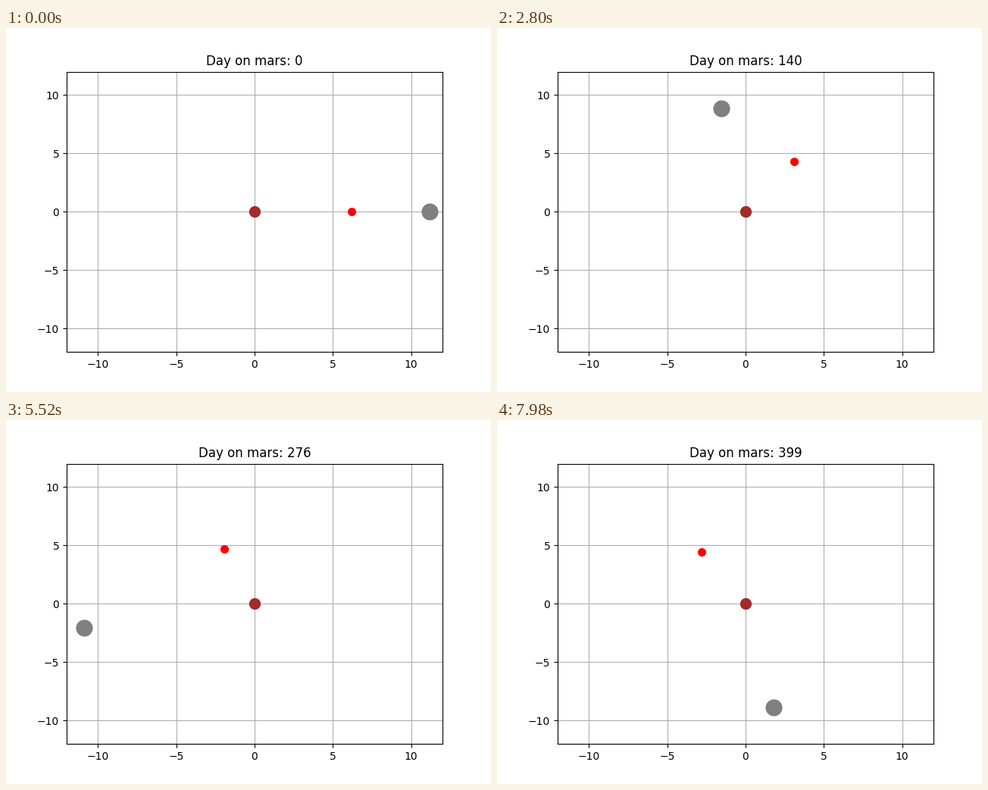
A matplotlib script for the animation above (8000 ms loop, 640x480 px).

```python
import numpy as np
import matplotlib.pyplot as plt
from matplotlib.animation import FuncAnimation

FRAMES = 400
STEP_MS = 20
FLATTEN = 0.8  # vertical to horizontal radius of each orbit

# horizontal radius, degrees per day, colour, marker size
MOONS = [
    (6.2, 3.0, "red", 7),
    (11.2, 0.7, "gray", 15),
]

fig, ax = plt.subplots(figsize=(6.4, 4.8), dpi=100)
ax.set_xlim(-12, 12)
ax.set_ylim(-12, 12)
ax.set_xticks(range(-10, 11, 5))
ax.set_yticks(range(-10, 11, 5))
ax.grid(True)
title = ax.set_title("Day on mars: 0")

ax.plot([0], [0], "o", color="brown", markersize=10)
dots = [ax.plot([], [], "o", color=color, markersize=size)[0]
        for _, _, color, size in MOONS]


def orbit(radius, speed, day):
    angle = np.radians(speed * day)
    return radius * np.cos(angle), FLATTEN * radius * np.sin(angle)


def update(day):
    title.set_text(f"Day on mars: {day}")
    for dot, (radius, speed, _, _) in zip(dots, MOONS):
        x, y = orbit(radius, speed, day)
        dot.set_data([x], [y])
    return [title, *dots]


anim = FuncAnimation(fig, update, frames=FRAMES, interval=STEP_MS,
                     repeat=True, repeat_delay=0, blit=False)
plt.show()
```
